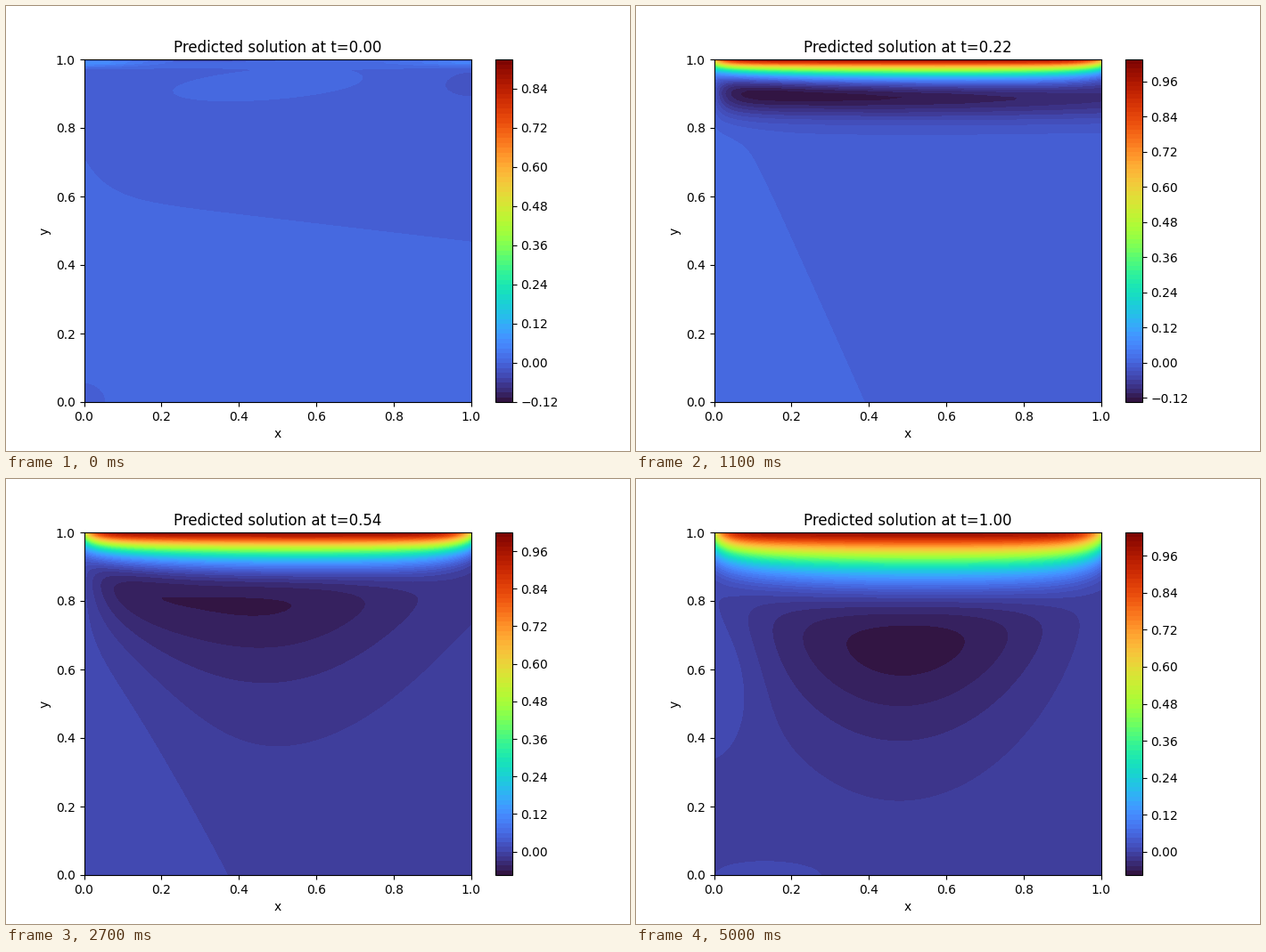
A matplotlib script that plays this animation: 700 px wide and 500 px high, repeating every 5100 ms.

```python
import numpy as np
import matplotlib.pyplot as plt
from matplotlib.animation import FuncAnimation
from matplotlib.ticker import MaxNLocator

FRAMES, INTERVAL = 51, 100
UNIT = 0.015          # weak flow terms are written in multiples of this

axis = np.linspace(0, 1, 101)
X, Y = np.meshgrid(axis, axis)
S = 1 - Y             # depth below the lid


def ramp(t, start, end):
    """Smooth step from 0 to 1."""
    p = np.clip((t - start) / (end - start), 0, 1)
    return p * p * (3 - 2 * p)


def bump(x, y, wx, wy):
    return np.exp(-(x / wx) ** 2 - (y / wy) ** 2)


def lid_layer(t):
    """Boundary layer under the moving lid, slower and thinner at the walls."""
    edge = ramp(t, .05, .3)
    thick = 1 - edge * (.4 * np.exp(-X / .2) + .35 * np.exp((X - 1) / .15))
    speed = 1 - edge * (.5 * np.exp(-X / .03) + .4 * np.exp((X - 1) / .04))
    delta = .094 * max(t, .01) ** .6
    return min(1, t / .02) * speed * np.exp(-(S / (delta * thick)) ** 1.4)


def back_flow(t):
    """Strong reversed band that fades as it sinks."""
    amp = 1.87 * np.exp(-t / .085) * (1 - np.exp(-(t / .03) ** 2))
    along = np.exp(-1.7 * np.exp(-5 * t) * (X - .17) ** 2)
    along = along * (1 - ramp(t, .05, .3) * np.exp(-X / .03))
    depth = .003 + .41 * t + .015 * X
    across = np.exp(-((S - depth) / (.026 + .2 * t)) ** 2)
    return amp * along * across


def eddy(t):
    """Slow vortex that sinks and turns symmetric with time."""
    young = 1.2 * (1 - t)
    left = np.exp(-(X / .25) ** 2)
    near_wall = 10 * X * np.exp(1 - 10 * X)
    strength = np.sin(np.pi * X) + 1.1 * young * near_wall
    strength = strength + (1.15 - 1.05 * t) * X ** 4
    core = .385 * t - .08 - .8 * (X - .45) ** 2 + .25 * young * left
    size = .19 * (1 - np.clip(young, 0, .8) * left)
    return (3.9 + .5 * t ** 3) * strength / np.cosh((S - core) / size)


def start_drift():
    """Weak pattern of the first moment."""
    middle = .6 - .133 * X + .11 * np.exp(-X / .06)
    drift = .4 * np.tanh((middle - Y) / .15)
    drift += .65 * bump(X - .48, Y - .925 - .08 * (X - .45), .35, .062)
    drift -= .9 * bump(X - 1, Y - .93, .13, .063)
    drift -= .7 * bump(X, Y, .075, .075)
    return drift


def side_drift(t):
    """Slightly positive on the left, negative on the right."""
    h = ramp(t, .08, .22)
    border = (.98 - .59 * h) * S ** (2 - h) - .04
    return 1.1 / (1 + np.exp((X - border) / .07)) - .4


def late_drift():
    """Two small positive pockets, at the left wall and at the floor."""
    wall = 1.3 * bump(X, Y - .57, .11, .19)
    floor = .6 * bump(X - .17, Y, .2, .06)
    return wall + floor - .3


def drift(t):
    early, late = ramp(t, 0, .08), ramp(t, .7, 1)
    flow = (1 - early) * start_drift() + early * side_drift(t)
    return (1 - late) * flow + late * late_drift()


def start_strip(t):
    """Thin ripple along the lid at the very start."""
    walls = np.exp(-(X / .15) ** 2) + .7 * np.exp(-((1 - X) / .15) ** 2) + .2
    light = .07 * np.exp(-((S - .012) / .008) ** 2) * walls
    dark = .05 * bump(X - .3, S, .15, .006)
    return max(0, 1 - t / .02) * (light - dark)


def field(t):
    grown = ramp(t, .18, .42)
    flow = UNIT * (drift(t) - grown * eddy(t)) - (1 - grown) * back_flow(t)
    layer = lid_layer(t)
    return flow * (1 - layer) + layer + start_strip(t)


def contour_levels(t):
    lo = np.interp(t, [0, .02, .08, .14, .22, .42],
                   [-.118, -.55, -.69, -.345, -.134, -.066])
    hi = np.interp(t, [0, .08, .22, .68, .84, 1],
                   [.925, 1.215, 1.03, 1.003, 1.004, 1.033])
    ticks = MaxNLocator(101, min_n_ticks=1).tick_values(lo, hi)
    step = ticks[1] - ticks[0]
    return ticks[(ticks > lo - step) & (ticks < hi + step)]


fig = plt.figure(figsize=(7, 5), dpi=100)


def draw(i):
    t = i / (FRAMES - 1)
    fig.clear()
    ax = fig.add_subplot()
    levels = contour_levels(t)
    u = np.clip(field(t), levels[0], levels[-1])
    filled = ax.contourf(X, Y, u, levels=levels, cmap="turbo")
    fig.colorbar(filled, ax=ax)
    ax.set_title(f"Predicted solution at t={t:.2f}")
    ax.set_xlabel("x")
    ax.set_ylabel("y")
    return []


anim = FuncAnimation(fig, draw, frames=FRAMES, interval=INTERVAL, repeat=True)
plt.show()
```
